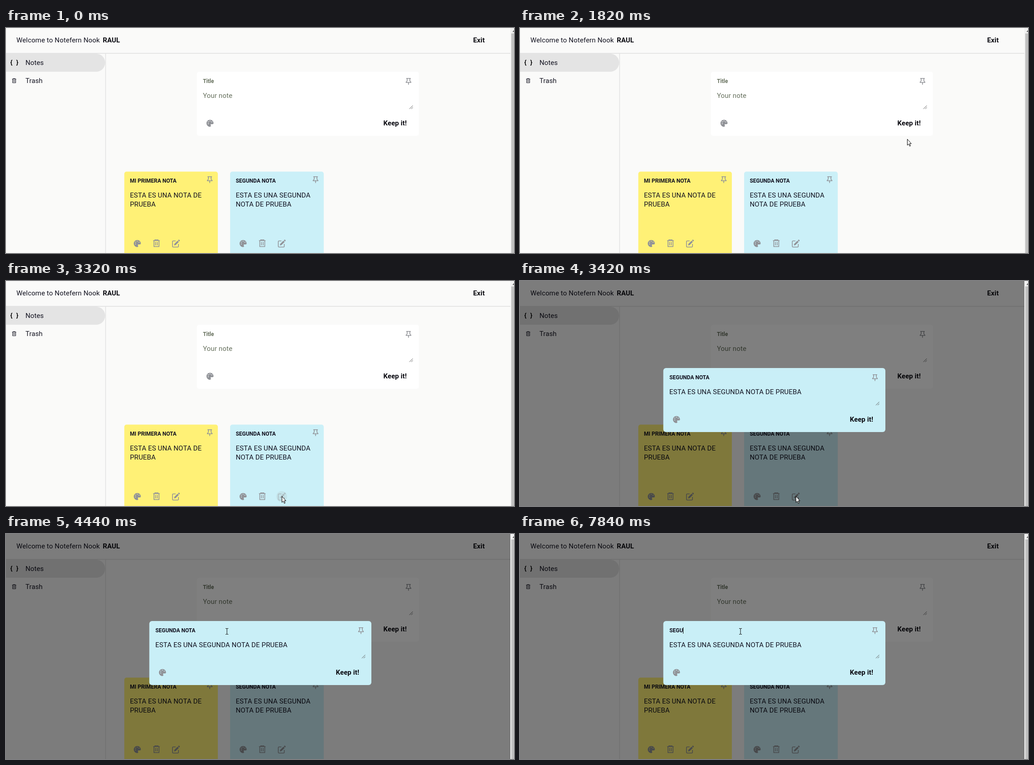
An HTML page for the animation above (8 s loop, 1122x499 px).

```html
<!DOCTYPE html>
<html lang="es">
<head>
<meta charset="utf-8">
<title>Notes</title>
<style>
  html, body { margin: 0; width: 100%; height: 100%; overflow: hidden; background: #fafaf9; }
  svg { display: block; }
  text { font: 15px Roboto, Arial, sans-serif; letter-spacing: .15px; fill: #11111f; white-space: pre; }
  .b { font-weight: 700; letter-spacing: .1px; fill: #08080f; }
  .t { font-weight: 700; font-size: 12px; letter-spacing: 0; }
  .ph { fill: #66705d; }
  .line { fill: none; stroke: currentColor; stroke-width: 1.6; }
  .icon { color: #919398; }
  .tip { fill: #fff; stroke: #000; stroke-width: 1; stroke-linejoin: round; }
</style>
</head>
<body>
<svg width="1122" height="499" viewBox="0 0 1122 499">
  <defs>
    <!-- icons are centred on 0,0 -->
    <g id="palette">
      <path transform="scale(.0305) translate(-256 -256)" fill="currentColor" fill-rule="evenodd"
        d="M512 256c0 38-34 64-70 64H344c-26 0-48 22-48 48 0 28 24 46 24 82 0 32-22 62-64 62C115 512 0 397 0 256S115 0 256 0 512 115 512 256z
           M96 288a32 32 0 1 0 64 0a32 32 0 1 0-64 0z M96 160a32 32 0 1 0 64 0a32 32 0 1 0-64 0z
           M224 96a32 32 0 1 0 64 0a32 32 0 1 0-64 0z M352 160a32 32 0 1 0 64 0a32 32 0 1 0-64 0z"/>
    </g>
    <g id="bin">
      <path class="line" d="M-7.3-6H7.3M-3.5-6V-7.8H3.5V-6M-5.5-6V7.3H5.5V-6M-1.9-3V4.5M1.9-3V4.5"/>
    </g>
    <g id="edit">
      <path class="line" d="M-.5-5.7H-6Q-7.5-5.7-7.5-4.2V6.2Q-7.5 7.7-6 7.7H4.2Q5.7 7.7 5.7 6.2V1"/>
      <path fill="currentColor" d="M-3.9 4.2L-3.3 .8 3.8-6.3 6.5-3.6-.6 3.5zM4.7-7.1L5.9-8.3Q6.7-9 7.5-8.2L8.3-7.4Q9.1-6.6 8.4-5.8L7.2-4.6z"/>
    </g>
    <g id="pin">
      <path class="line" d="M-5-6.2H5M-3-6.2V-1.2Q-3.4 1-5.3 1.9V2.8H5.3V1.9Q3.4 1 3-1.2V-6.2M0 2.8V7.8"/>
    </g>
    <g id="grip"><path d="M-4 3.5L3.5-4M0 3.5L3.5 0" stroke="#555" fill="none"/></g>
    <g id="tools" class="icon">
      <use href="#palette" x="290" y="478"/>
      <use href="#bin" x="332.3" y="477.5"/>
    </g>
    <g id="form">
      <use href="#pin" class="icon" x="889" y="118"/>
      <use href="#grip" x="895" y="176"/>
      <use href="#palette" class="icon" x="450.6" y="211.2"/>
      <text class="b" x="833.5" y="215.6">Keep it!</text>
    </g>
  </defs>

  <rect width="1122" height="499" fill="#fafaf9"/>
  <rect y="55.5" width="1114" height="1.6" fill="#e0e0e0"/>
  <rect x="219" y="57" width="2" height="442" fill="#e8e8e8"/>
  <text x="23" y="32">Welcome to Notefern Nook <tspan class="b" x="213.8">RAUL</tspan></text>
  <text class="b" x="1031.8" y="32">Exit</text>

  <path d="M0 57H199a20 20 0 0 1 0 40H0z" fill="#e4e4e4"/>
  <path class="line" d="M14 71.3Q11.8 71.3 11.8 73.4V75Q11.8 76.8 10 76.9Q11.8 77 11.8 78.8V80.4Q11.8 82.5 14 82.5M22.8 71.3Q25 71.3 25 73.4V75Q25 76.8 26.8 76.9Q25 77 25 78.8V80.4Q25 82.5 22.8 82.5"/>
  <text x="42.9" y="82">Notes</text>
  <use href="#bin" transform="translate(18 117) scale(.62)" color="#11111f"/>
  <text x="42.9" y="122">Trash</text>

  <rect x="421.5" y="97" width="490.5" height="142" rx="5" fill="#fff"/>
  <use href="#form"/>
  <text class="t ph" x="434.9" y="122">Title</text>
  <text class="ph" x="434.9" y="155">Your note</text>

  <g>
    <rect x="261.3" y="318.6" width="206.6" height="200" rx="5" fill="#fff176"/>
    <use href="#pin" class="icon" x="450" y="336"/>
    <text class="t" x="273.7" y="343">MI PRIMERA NOTA</text>
    <text x="273.7" y="376">ESTA ES UNA NOTA DE</text>
    <text x="273.7" y="396">PRUEBA</text>
    <use href="#tools"/>
    <use href="#edit" class="icon" x="375.2" y="478"/>
  </g>
  <g>
    <rect x="495" y="318.6" width="206.8" height="200" rx="5" fill="#cbf0f8"/>
    <use href="#pin" class="icon" x="683.7" y="336"/>
    <text class="t" x="507.4" y="343">SEGUNDA NOTA</text>
    <text x="507.4" y="376">ESTA ES UNA SEGUNDA</text>
    <text x="507.4" y="396">NOTA DE PRUEBA</text>
    <use href="#tools" x="233.7"/>
    <circle id="halo" cx="609" cy="478" r="12" fill="#c4e4ea"/>
    <use id="pencil" href="#edit" class="icon" x="608.9" y="478"/>
  </g>

  <g id="modal">
    <rect width="1114" height="499" fill="#000" opacity=".5"/>
    <rect x="316.5" y="193" width="490.5" height="142" rx="6" fill="#c9eff7"/>
    <use href="#form" x="-105" y="96"/>
    <text id="title" class="t" x="329.9" y="218"></text>
    <rect id="caret" y="207" width="1" height="14" fill="#000"/>
    <text x="329.8" y="251">ESTA ES UNA SEGUNDA NOTA DE PRUEBA</text>
  </g>

  <rect x="1114" width="8" height="499" fill="#f1f1f1"/>
  <rect x="1116" y="12" width="6" height="487" fill="#c1c1c1"/>
  <path d="M1118.5 8.5L1122.5 4.5V8.5z" fill="#505050"/>

  <g id="cursor">
    <path id="arrow" class="tip" d="M.5.5V14L3.5 11.2 5.7 16.2 7.6 15.3 5.5 10.5H9.3z"/>
    <path id="hand" class="tip" d="M-1.5 13V1.8Q-1.5.5 0 .5T1.5 1.8V6.5Q2.8 5.8 3.9 7Q5.2 6.3 6.2 7.7Q8.6 7.1 8.6 9.5V13.5Q8.6 15.5 7.2 17V19.5H-.8V17.4L-4.6 12.2Q-5.4 10.4-4 10Q-3 9.8-1.5 12M1.5 6.5V10M3.9 7V10M6.2 7.7V10.5"/>
    <path id="beam" fill="none" stroke="#000" d="M-3-6.5H-.8L0-5.7.8-6.5H3M0-6V6M-3 6.5H-.8L0 5.7.8 6.5H3"/>
  </g>
</svg>
<script>
const LOOP = 8000;
const $ = id => document.getElementById(id);
const show = (id, on) => $(id).setAttribute('visibility', on ? 'inherit' : 'hidden');

const linear = u => u;
const smooth = u => u * u * (3 - 2 * u);

// Pointer moves: start, end, number of steps, easing, points on the way
const moves = [
  [590, 680, 4, linear, [[1095, 483], [1030, 405], [985, 360], [968, 347]]],
  [920, 1010, 3, linear, [[967, 347], [966, 347], [965, 347]]],
  [1430, 2220, 27, smooth, [[966, 344], [973, 318], [915, 262], [820, 246], [715, 290], [640, 385], [602, 463]]],
  [2250, 2720, 11, smooth, [[602, 464], [605, 471], [609, 477]]],
  [3680, 4440, 25, smooth, [[610, 476], [621, 435], [625, 370], [609, 303], [568, 260], [510, 230], [488, 215.5]]],
  [4540, 4660, 2, linear, [[487.5, 215.5], [487, 215.5]]]
];

// Title edits: time, letters left
const edits = [[0, 12], [5470, 11], [5950, 10], [6010, 9], [6070, 8], [7570, 6], [7750, 5], [7840, 4]];
const blinks = [4540, 5070, 5590, 6140, 6630, 7140, 7660];

function spline(pts, u) {
  const last = pts.length - 1;
  const i = Math.min(last - 1, Math.floor(u * last));
  const f = u * last - i;
  const at = k => pts[Math.max(0, Math.min(last, k))];
  return [0, 1].map(c => {
    const [a, b, d, e] = [at(i - 1)[c], at(i)[c], at(i + 1)[c], at(i + 2)[c]];
    return b + f / 2 * (d - a + f * (2 * a - 5 * b + 4 * d - e + f * (3 * (b - d) + e - a)));
  });
}

function pointer(t) {
  const move = moves.filter(m => t >= m[0]).pop();
  if (!move) return null;
  const [start, end, n, ease, pts] = move;
  const step = Math.floor((t - start) / (end - start) * (n - 1) + 0.01);
  return spline(pts, ease(Math.min(1, step / (n - 1))));
}

function draw(t) {
  const open = t >= 3420;
  const pos = pointer(t);
  let hover = false;
  show('cursor', pos);
  if (pos) {
    const [x, y] = pos;
    hover = !open && Math.hypot(x - 609, y - 478) < 17;
    const hand = hover && t < 3120;
    const beam = open && x > 330 && x < 794 && (y > 204 && y < 224 || y > 236 && y < 278);
    $('cursor').setAttribute('transform', `translate(${Math.round(x)} ${Math.round(y)})`);
    show('hand', hand);
    show('beam', beam);
    show('arrow', !hand && !beam);
  }
  // the halo fades in as the pointer arrives
  show('halo', hover);
  $('halo').setAttribute('opacity', Math.max(0, Math.min(1, (t - 2130) / 250)));
  $('pencil').setAttribute('opacity', hover ? 0.5 : 1);

  show('modal', open);
  const left = edits.filter(e => t >= e[0]).pop()[1];
  const title = $('title');
  title.textContent = 'SEGUNDA NOTA'.slice(0, left);
  $('caret').setAttribute('x', Math.round(329.6 + title.getComputedTextLength()));
  show('caret', open && blinks.filter(b => t >= b).length % 2);
}

const begin = performance.now();
function tick() {
  draw((performance.now() - begin) % LOOP);
  requestAnimationFrame(tick);
}
tick();
</script>
</body>
</html>
```
